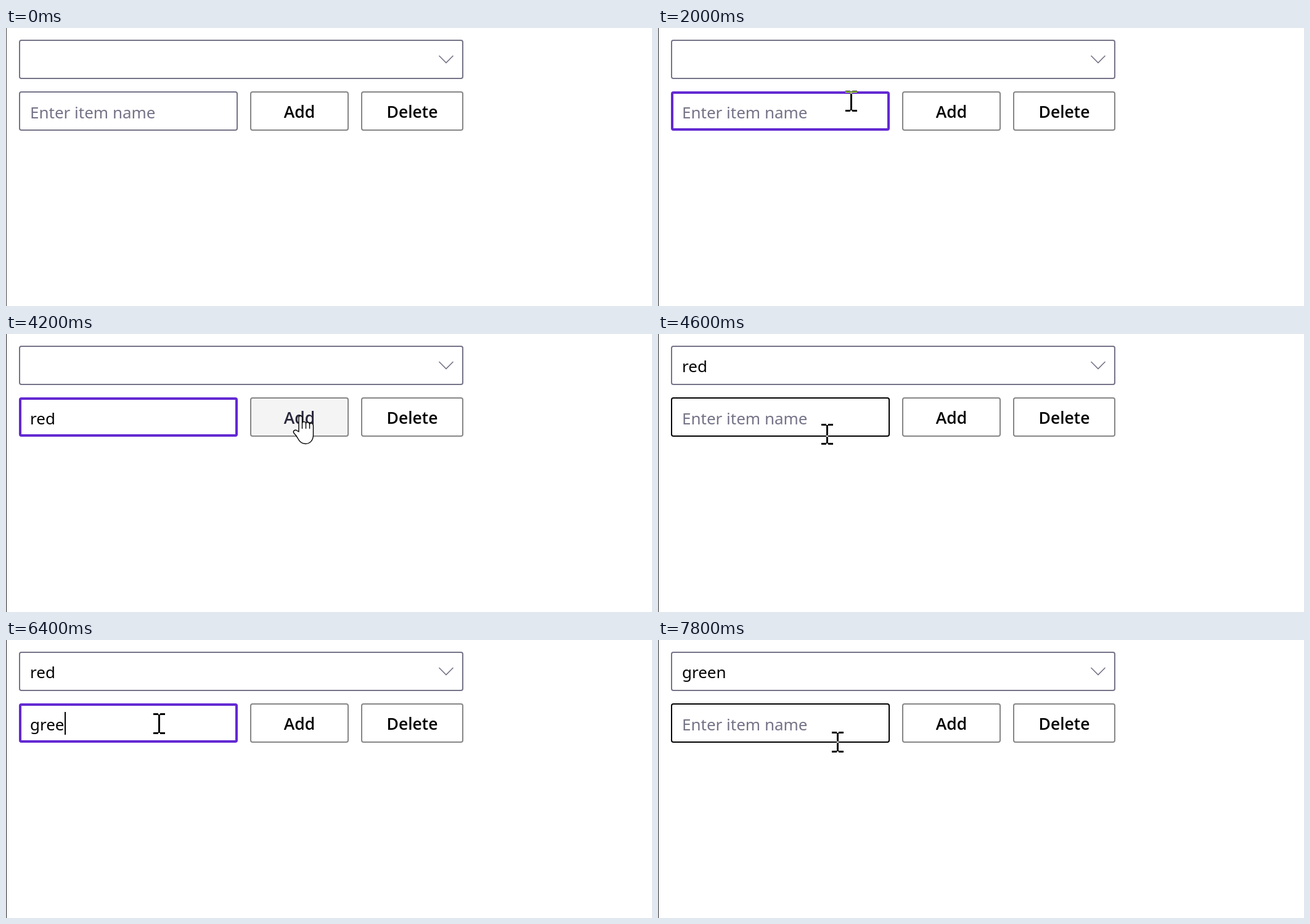
Write an HTML page with a canvas that moves like this. It is 1048 px wide and 452 px high and loops after 8 s.

```html
<!DOCTYPE html>
<html lang="en">
<head>
<meta charset="utf-8">
<title>Add items to a drop-down list</title>
<style>
html, body { margin: 0; width: 100%; height: 100%; overflow: hidden; background: #fff; }
canvas { display: block; width: 1048px; height: 452px; }
</style>
</head>
<body>
<canvas id="stage" width="1048" height="452"></canvas>
<script>
const ctx = document.getElementById('stage').getContext('2d');
const LOOP = 8000;
const GRAY = '#757387', PURPLE = '#6329d2';
const TEXT_FONT = '26px "Noto Sans", "Open Sans", sans-serif';
const BUTTON_FONT = '600 26.5px "Open Sans", "Noto Sans", sans-serif';

const start = { edge: '#444', field: 'idle', typed: '', chosen: '', caret: false, over: false, cursor: null };

// Each entry changes part of the state at its time in ms.
const timeline = [
  [600, { cursor: ['arrow', 541, 404] }],
  [800, { cursor: ['arrow', 446, 262] }],
  [1000, { cursor: ['arrow', 350, 176] }],
  [1200, { cursor: ['beam', 311, 119], field: 'hover' }],
  [1400, { cursor: ['beam', 315, 118] }],
  [1600, { field: 'focus', caret: true, edge: '#262626' }],
  [1800, { cursor: ['beam', 314, 119] }],
  [2000, { cursor: ['beam', 313, 119], caret: false }],
  [2600, { caret: true }],
  [3000, { typed: 'red' }],
  [3400, { cursor: ['beam', 363, 123] }],
  [3600, { cursor: ['hand', 413, 112], over: true }],
  [3800, { cursor: ['hand', 448, 125] }],
  [4000, { cursor: ['hand', 462, 130], caret: false }],
  [4200, { cursor: ['hand', 466, 132] }],
  [4400, { field: 'idle', typed: '', chosen: 'red' }],
  [4600, { cursor: ['beam', 274, 163], field: 'hover', over: false }],
  [4800, { cursor: ['beam', 262, 146] }],
  [5000, { cursor: ['beam', 252, 138], field: 'focus', caret: true }],
  [5200, { cursor: ['beam', 248, 136] }],
  [5400, { caret: false }],
  [5800, { typed: 'g', caret: true }],
  [6200, { typed: 'gre' }],
  [6400, { typed: 'gree' }],
  [6800, { typed: 'green', cursor: ['beam', 330, 142] }],
  [7000, { cursor: ['hand', 430, 136], over: true }],
  [7200, { cursor: ['hand', 456, 139], caret: false }],
  [7400, { cursor: ['hand', 466, 150] }],
  [7600, { field: 'idle', typed: '', chosen: 'green' }],
  [7800, { cursor: ['beam', 291, 166], field: 'hover', over: false }]
];

function stateAt(time) {
  const state = { ...start };
  for (const [at, change] of timeline) {
    if (at <= time) Object.assign(state, change);
  }
  return state;
}

function box(x, y, w, h, color, line = 2, fill = '#fff') {
  ctx.beginPath();
  ctx.roundRect(x + line / 2, y + line / 2, w - line, h - line, 4 - line / 2);
  ctx.fillStyle = fill;
  ctx.fill();
  ctx.strokeStyle = color;
  ctx.lineWidth = line;
  ctx.stroke();
}

function label(text, x, y, color, font = TEXT_FONT, align = 'left') {
  ctx.font = font;
  ctx.textAlign = align;
  ctx.fillStyle = color;
  ctx.fillText(text, x, y);
}

function button(text, x, w, over) {
  box(x, 103, w, 64, '#868686', 2, over ? '#f4f4f4' : '#fff');
  label(text, x + w / 2, 146, over ? '#29273c' : '#000', BUTTON_FONT, 'center');
}

function comboBox(text) {
  box(21, 19, 721, 64, GRAY);
  label(text, 39, 62, '#000');
  ctx.beginPath();
  ctx.moveTo(702.5, 45);
  ctx.lineTo(714, 56.5);
  ctx.lineTo(725.5, 45);
  ctx.strokeStyle = GRAY;
  ctx.lineWidth = 1.6;
  ctx.stroke();
}

function textField({ field, typed, caret }) {
  const color = { idle: GRAY, hover: '#000', focus: PURPLE }[field];
  box(21, 103, 355, 64, color, field === 'focus' ? 4 : 2);
  label(typed || 'Enter item name', 39, 147, typed ? '#000' : GRAY);
  if (caret) {
    ctx.fillStyle = '#000';
    ctx.fillRect(Math.round(39 + ctx.measureText(typed).width * (typed ? 1 : 0)), 117, 2, 37);
  }
}

function outline() {
  ctx.fillStyle = '#fff';
  ctx.strokeStyle = '#000';
  ctx.lineWidth = 1.4;
  ctx.lineJoin = 'round';
  ctx.fill();
  ctx.stroke();
}

const cursors = {
  // Inverts whatever lies below, with its origin in the middle.
  beam() {
    ctx.globalCompositeOperation = 'difference';
    ctx.fillStyle = '#fff';
    for (const y of [-17, 14]) {
      ctx.fillRect(-9, y, 8, 3);
      ctx.fillRect(2, y, 8, 3);
    }
    ctx.fillRect(-1, -15, 3, 30);
  },
  hand() {
    ctx.beginPath();
    ctx.moveTo(9, 27);
    ctx.lineTo(9, 4);
    ctx.bezierCurveTo(9, 0, 14.5, 0, 14.5, 4);
    ctx.lineTo(14.5, 14);
    ctx.bezierCurveTo(14.5, 9.5, 20.5, 9.5, 20.5, 14);
    ctx.bezierCurveTo(20.5, 10.5, 26.5, 10.5, 26.5, 15);
    ctx.bezierCurveTo(26.5, 12, 32.5, 12, 32.5, 17);
    ctx.lineTo(32.5, 32);
    ctx.bezierCurveTo(32.5, 41, 27, 46.5, 20, 46.5);
    ctx.bezierCurveTo(13, 46.5, 9.5, 42, 7, 37);
    ctx.bezierCurveTo(5, 33, 3, 31, 1, 29);
    ctx.bezierCurveTo(-1, 26, 2, 23.5, 5, 24.5);
    ctx.closePath();
    outline();
    ctx.beginPath();
    for (const x of [14.5, 20.5, 26.5]) {
      ctx.moveTo(x, 14);
      ctx.lineTo(x, 22);
    }
    ctx.stroke();
  },
  arrow() {
    ctx.beginPath();
    ctx.moveTo(1, 1);
    ctx.lineTo(1, 32);
    ctx.lineTo(8, 25.5);
    ctx.lineTo(13, 37);
    ctx.lineTo(18, 35);
    ctx.lineTo(13, 24);
    ctx.lineTo(23, 23);
    ctx.closePath();
    outline();
  }
};

function drawCursor([kind, x, y]) {
  ctx.save();
  ctx.translate(x, y);
  cursors[kind]();
  ctx.restore();
}

function draw(time) {
  const state = stateAt(time);
  ctx.fillStyle = '#fff';
  ctx.fillRect(0, 0, 1048, 452);
  ctx.fillStyle = state.edge;
  ctx.fillRect(0, 0, 1, 452);
  comboBox(state.chosen);
  textField(state);
  button('Add', 396, 160, state.over);
  button('Delete', 576, 166, false);
  if (state.cursor) drawCursor(state.cursor);
}

const began = performance.now();
function tick() {
  draw((performance.now() - began) % LOOP);
  requestAnimationFrame(tick);
}
tick();
</script>
</body>
</html>
```
